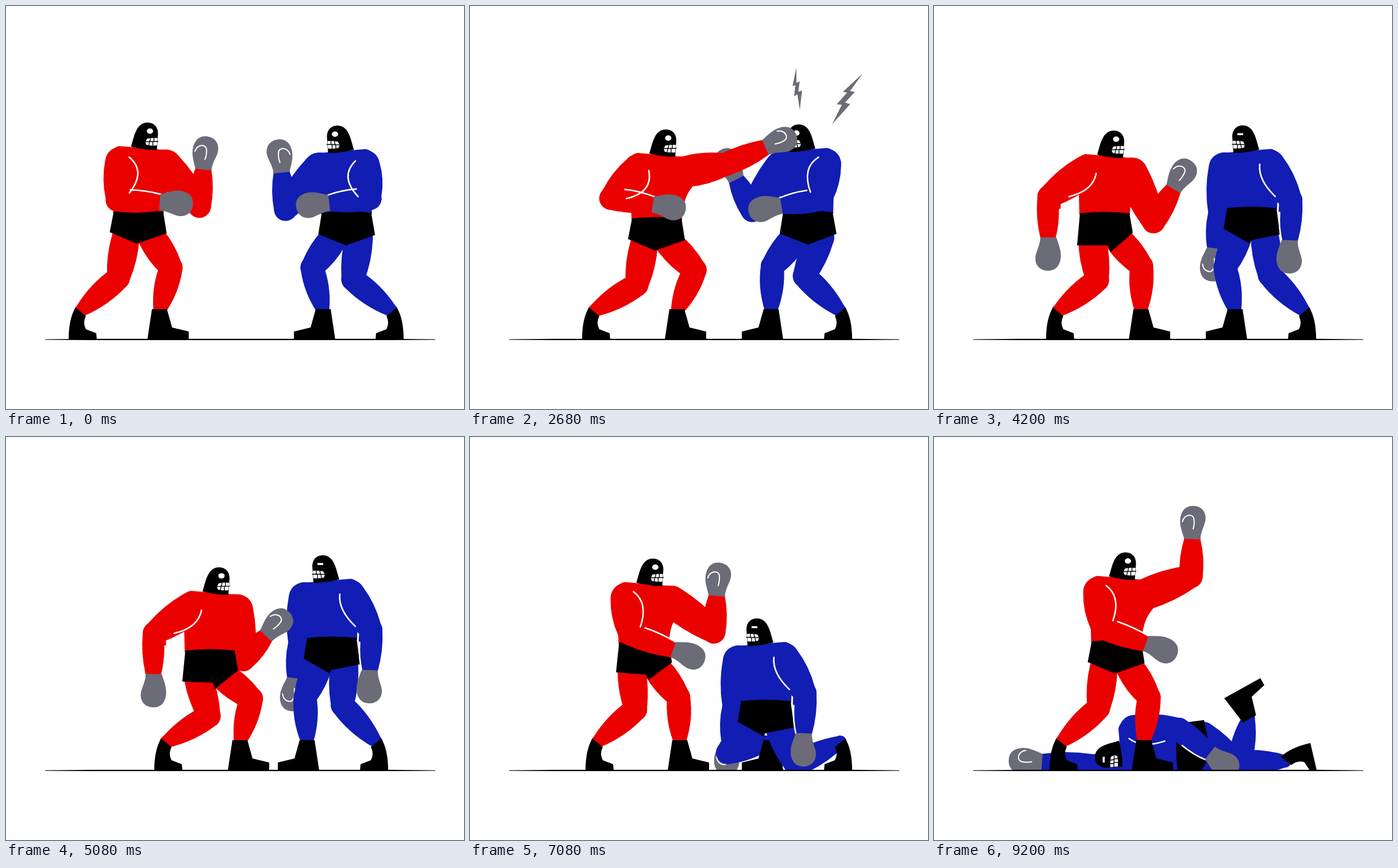
These frames come from a looping animation (797x702 px, 9.24 s). An HTML page with a canvas:

```html
<!DOCTYPE html>
<html lang="en">
<head>
<meta charset="utf-8">
<title>Boxing match</title>
<style>
html, body { margin: 0; width: 100%; height: 100%; overflow: hidden; background: #fff; }
canvas { display: block; }
</style>
</head>
<body>
<canvas id="stage" width="797" height="702"></canvas>
<script>
const ctx = document.getElementById('stage').getContext('2d');
const LOOP = 9240, STEP = 40, BEAT = 520, GROUND = 581, FLIP = 800;
const GREY = '#6c6b78', BLACK = '#000', WHITE = '#fff';

// Arms are elbow x, y and wrist x, y measured from the shoulder.
const REAR = {
  tuck: [-6, 66, 69, 70], bent: [-49, 51, 25, 62], hang: [-66, 46, -67, 118],
  cross: [6, 62, 83, 90], hook: [82, 2, 168, -20],
  brace: [-10, 58, 62, 66], reach: [31, 53, 118, 51], cover: [8, 61, 78, 73],
  limp: [-37, 61, -35, 132], fallen: [-77, -2, -132, 40]
};
const FRONT = {
  up: [58, 72, 65, 7], high: [74, 54, 79, -10], jab: [72, -13, 142, -43],
  cocked: [37, 85, 72, 27], push: [10, 87, 50, 45], cheer: [82, -32, 84, -98],
  low: [49, 76, 77, 21], swing: [85, 5, 165, -45],
  limp: [8, 80, 16, 141], fallen: [83, -18, 167, -24]
};

// Hip x is measured from the middle of the feet; crouch and fall run from 0 to 1.
const pose = (hipX, hipY, crouch, rear, front, fall = 0) =>
  [hipX, hipY, crouch, fall, ...REAR[rear], ...FRONT[front]];

const RED = {
  guard: pose(53, 357, 0, 'tuck', 'up'),
  duck: pose(27, 384, 1, 'bent', 'high'),
  coil: pose(18, 372, 1, 'bent', 'cocked'),
  jab: pose(58, 369, 0, 'bent', 'jab'),
  ready: pose(30, 360, 1, 'hang', 'cocked'),
  press: pose(33, 371, .9, 'hang', 'push'),
  windup: pose(18, 366, .9, 'hang', 'cocked'),
  hook: pose(66, 366, 0, 'hook', 'high'),
  stance: pose(30, 357, .8, 'cross', 'high'),
  cheer: pose(45, 355, 0, 'cross', 'cheer')
};
const BLUE = {
  guard: pose(40, 359, .3, 'brace', 'up'),
  duck: pose(41, 367, 1, 'reach', 'low'),
  swing: pose(67, 366, .5, 'reach', 'swing'),
  stunned: pose(17, 358, .2, 'cover', 'low'),
  hit: pose(13, 350, .2, 'limp', 'limp'),
  limp: pose(52, 351, 1, 'limp', 'limp'),
  dazed: pose(38, 349, 1, 'limp', 'limp'),
  kneel: pose(90, 459, 1, 'limp', 'limp'),
  fallen: pose(182, 542, 1, 'fallen', 'fallen', 1)
};

// Moves: [time, pose, rear heel, front heel]; left-out heels stay where they are.
// Both boxers face right in their own space; the blue one is mirrored.
const red = fighter('#eb0000', 1, Infinity, [
  [0, RED.guard, 109, 246], [1160, RED.guard], [1440, RED.duck, 109, 300],
  [1900, RED.duck, 195, 339], [2400, RED.coil], [2600, RED.jab], [2740, RED.jab],
  [3120, RED.coil], [3320, RED.jab], [3460, RED.jab], [3740, RED.ready],
  [4200, RED.ready], [4480, RED.ready], [4760, RED.press, 258, 386], [5080, RED.press],
  [5360, RED.windup, 201, 344], [5540, RED.hook], [5660, RED.hook],
  [5920, RED.stance], [7080, RED.stance], [7560, RED.cheer], [9200, RED.cheer]
]);
const blue = fighter('#121db3', .5, 3320, [
  [0, BLUE.guard, 108, 227], [480, BLUE.guard], [900, BLUE.duck, 135, 255],
  [1000, BLUE.duck], [1140, BLUE.swing], [1240, BLUE.swing], [1440, BLUE.duck],
  [2480, BLUE.duck], [2640, BLUE.stunned], [2800, BLUE.stunned], [3280, BLUE.stunned],
  [3400, BLUE.hit], [3700, BLUE.limp], [4200, BLUE.limp], [5080, BLUE.dazed],
  [5540, BLUE.dazed], [5660, BLUE.hit], [5960, BLUE.limp], [6560, BLUE.kneel],
  [7080, BLUE.kneel], [7560, BLUE.fallen]
]);

// Punches that land: when, on whom, and how far the bolts shift.
const HITS = [
  { start: 1160, onBlue: false, dx: 8, dy: -17 },
  { start: 2600, onBlue: true, dx: 0, dy: 0 },
  { start: 3320, onBlue: true, dx: -12, dy: -21 },
  { start: 5560, onBlue: true, dx: 0, dy: -33 }
];
const BOLT_TIME = 240;

const SHAPES = {
  rearBoot: new Path2D('M12-56Q0-36 0 0H49L48-11L30-18Q24-29 30-41Z'),
  frontBoot: new Path2D('M8-53L0 0H72V-14L43-21L34-53Z'),
  head: new Path2D('M-33 27C-27 8-24-15-4-15C8-15 14-6 14 4L12 33Q-10 33-33 27Z'),
  teeth: new Path2D('M-8 19L-5 13Q5 11 13 12L12 25Q3 26-6 24Z'),
  gaps: new Path2D('M-9 18.5L14 18M1 11L0 18M7 11V18M-1 18L-2 26M5 18V26'),
  glove: new Path2D('M-1-14C14-19 22-23 35-22C50-20 58-12 57 2C56 18 42 25 28 21C18 18 10 14-1 14Z'),
  thumb: new Path2D('M29-18C42-16 45 1 33 2Q24 3 17 1'),
  ground: new Path2D('M68 580.4L150 579.8H670L747 580.4V581.4L670 582H150L68 581.6Z')
};

function fighter(color, hemTilt, closeEye, moves) {
  let heels;
  const track = moves.map(([time, values, ...feet]) => {
    if (feet.length) heels = feet;
    return { time, values: [...heels, ...values] };
  });
  return { color, hemTilt, closeEye, track };
}

// Eased values at time t, plus a bounce that is zero at every key.
function sample(track, t) {
  const i = track.findIndex(key => key.time > t);
  if (i < 0) return { values: track[track.length - 1].values, bounce: 0 };
  const a = track[i - 1], b = track[i], length = b.time - a.time;
  const p = (t - a.time) / length, e = p * p * (3 - 2 * p);
  return {
    values: a.values.map((v, k) => v + (b.values[k] - v) * e),
    bounce: Math.sin(Math.PI * p * Math.round(length / BEAT)) ** 2
  };
}

const rad = deg => deg * Math.PI / 180;
const dist = (a, b) => Math.hypot(b[0] - a[0], b[1] - a[1]);
const unit = (a, b) => [(b[0] - a[0]) / dist(a, b), (b[1] - a[1]) / dist(a, b)];
const place = (o, angle, x, y) => {
  const c = Math.cos(angle), s = Math.sin(angle);
  return [o[0] + x * c - y * s, o[1] + x * s + y * c];
};
// Point reached by going `along` direction u and `side` to its left.
const offset = (p, u, along, side) =>
  [p[0] + u[0] * along + u[1] * side, p[1] + u[1] * along - u[0] * side];

function at(p, angle, draw) {
  ctx.save();
  ctx.translate(p[0], p[1]);
  ctx.rotate(angle);
  draw();
  ctx.restore();
}

function mirrored(draw) {
  ctx.save();
  ctx.translate(FLIP, 0);
  ctx.scale(-1, 1);
  draw();
  ctx.restore();
}

function fill(shape, color) {
  ctx.fillStyle = color;
  ctx.fill(shape);
}

function stroke(shape, color, width) {
  ctx.strokeStyle = color;
  ctx.lineWidth = width;
  ctx.lineCap = 'round';
  ctx.stroke(shape);
}

function bone(a, b, ra, rm, rb, color) {
  const u = unit(a, b), len = dist(a, b);
  const bulge = 2 * rm - (ra + rb) / 2;
  at(a, Math.atan2(u[1], u[0]), () => {
    const p = new Path2D();
    p.moveTo(0, -ra);
    p.quadraticCurveTo(len / 2, -bulge, len, -rb);
    p.arc(len, 0, rb, -Math.PI / 2, Math.PI / 2);
    p.quadraticCurveTo(len / 2, bulge, 0, ra);
    p.arc(0, 0, ra, Math.PI / 2, Math.PI * 1.5);
    fill(p, color);
  });
}

function findKnee(hip, ankle, thigh, shin) {
  const d = Math.min(dist(hip, ankle), thigh + shin);
  const along = (thigh ** 2 - shin ** 2 + d * d) / (2 * d);
  return offset(hip, unit(hip, ankle), along, Math.sqrt(Math.max(0, thigh ** 2 - along ** 2)));
}

function leg(hip, foot, angle, thigh, shin, boot, color) {
  const ankle = place(foot, angle, 21, -50);
  const knee = findKnee(hip, ankle, thigh, shin);
  bone(hip, knee, 24, 25, 20, color);
  bone(knee, ankle, 20, 20, 11, color);
  at(foot, angle, () => fill(boot, BLACK));
}

function arm(shoulder, [ex, ey, wx, wy], color, rear) {
  const elbow = [shoulder[0] + ex, shoulder[1] + ey];
  const wrist = [shoulder[0] + wx, shoulder[1] + wy];
  const u = unit(shoulder, elbow), v = unit(elbow, wrist);
  bone(shoulder, elbow, 27, 27, 20, color);
  bone(elbow, wrist, 20, 20, 14, color);
  if (rear) {
    const flex = Math.min(1, 1 - u[0] * v[0] - u[1] * v[1]);
    const line = new Path2D();
    line.moveTo(...offset(shoulder, u, -10, 14));
    line.quadraticCurveTo(...offset(shoulder, u, 12, 28 + 18 * flex), ...offset(shoulder, u, 52, 20));
    line.moveTo(...offset(elbow, v, 22, 19));
    line.quadraticCurveTo(...offset(elbow, v, 48, 20), ...offset(wrist, v, 0, 14));
    stroke(line, WHITE, 2.6);
  }
  at(wrist, Math.atan2(v[1], v[0]), () => {
    fill(SHAPES.glove, GREY);
    if (!rear) stroke(SHAPES.thumb, WHITE, 2);
  });
}

function torso(drop, color) {
  const top = y => y + drop;
  const p = new Path2D();
  p.moveTo(-44, 4);
  p.lineTo(-45, -38);
  p.bezierCurveTo(-58, top(-70), -53, top(-112), -33, top(-113));
  p.lineTo(38, top(-107));
  p.bezierCurveTo(60, top(-108), 75, top(-95), 73, top(-72));
  p.bezierCurveTo(70, top(-55), 46, -52, 44, 4);
  fill(p, color);
}

function trunks(hem) {
  const p = new Path2D();
  p.moveTo(-43, 1);
  p.quadraticCurveTo(0, -4, 43, 1);
  p.lineTo(49, 39 - 4 * hem);
  p.lineTo(-3 + 13 * hem, 57 + 12 * hem);
  p.lineTo(-3 + 9 * hem, 57);
  p.lineTo(-50 + 2 * hem, 37 + 20 * hem);
  fill(p, BLACK);
}

function head(closed) {
  fill(SHAPES.head, BLACK);
  fill(SHAPES.teeth, WHITE);
  stroke(SHAPES.gaps, BLACK, 1.4);
  const eye = new Path2D();
  if (closed) eye.rect(-5, -1.5, 10, 3.5);
  else eye.ellipse(0, 0, 5.5, 4.7, 0, 0, 7);
  fill(eye, WHITE);
}

function boxer(who, t) {
  const { values, bounce } = sample(who.track, t);
  const [rearHeel, frontHeel, hipX, hipY, crouch, fall, ...arms] = values;
  const bob = bounce * (1 - fall), drop = 11 * crouch + 6 * bob;
  const turn = rad(90 * fall);
  const hips = [(rearHeel + frontHeel) / 2 + hipX, hipY + 8 * bob];
  const joint = (x, y) => place(hips, turn, x, y);
  const rear = arms.slice(0, 4), front = arms.slice(4);
  front[3] += 16 * bob;

  arm(joint(48, drop - 80), front, who.color, false);
  leg(joint(22, 45), [frontHeel + 40 * fall, GROUND - 126 * fall], rad(209 * fall),
    64, 78, SHAPES.frontBoot, who.color);
  leg(joint(-22, 45), [rearHeel + 10 * fall, GROUND - 48 * fall], rad(103 * fall),
    73, 87, SHAPES.rearBoot, who.color);
  at(hips, turn, () => {
    torso(drop, who.color);
    trunks(crouch * who.hemTilt);
    at([20, drop - 139], 0, () => head(t >= who.closeEye));
  });
  arm(joint(-31, drop - 85), rear, who.color, true);
}

function bolt(a, b) {
  const u = unit(a, b), len = dist(a, b);
  const zigzag = [[0, 0], [.43, -13], [.41, -6], [.67, -11], [.63, -3],
    [1, 0], [.55, 9], [.57, 0], [.33, 5], [.36, -3]];
  const p = new Path2D();
  for (const [along, side] of zigzag) p.lineTo(...offset(a, u, along * len, -side * len / 103));
  fill(p, GREY);
}

function render(t) {
  ctx.fillStyle = WHITE;
  ctx.fillRect(0, 0, 797, 702);

  ctx.save();
  ctx.beginPath();
  ctx.rect(0, 0, 797, GROUND);
  ctx.clip();
  mirrored(() => boxer(blue, t));
  boxer(red, t);
  ctx.restore();

  for (const { start, onBlue, dx, dy } of HITS) {
    if (t < start || t >= start + BOLT_TIME) continue;
    const bolts = () => at([dx, dy], 0, () => {
      bolt([232, 107], [226, 181]);
      bolt([117, 118], [170, 206]);
    });
    onBlue ? mirrored(bolts) : bolts();
  }

  fill(SHAPES.ground, BLACK);
}

const begin = performance.now();
function tick() {
  const t = (performance.now() - begin) % LOOP;
  render(Math.floor(t / STEP) * STEP);
  requestAnimationFrame(tick);
}
tick();
</script>
</body>
</html>
```
